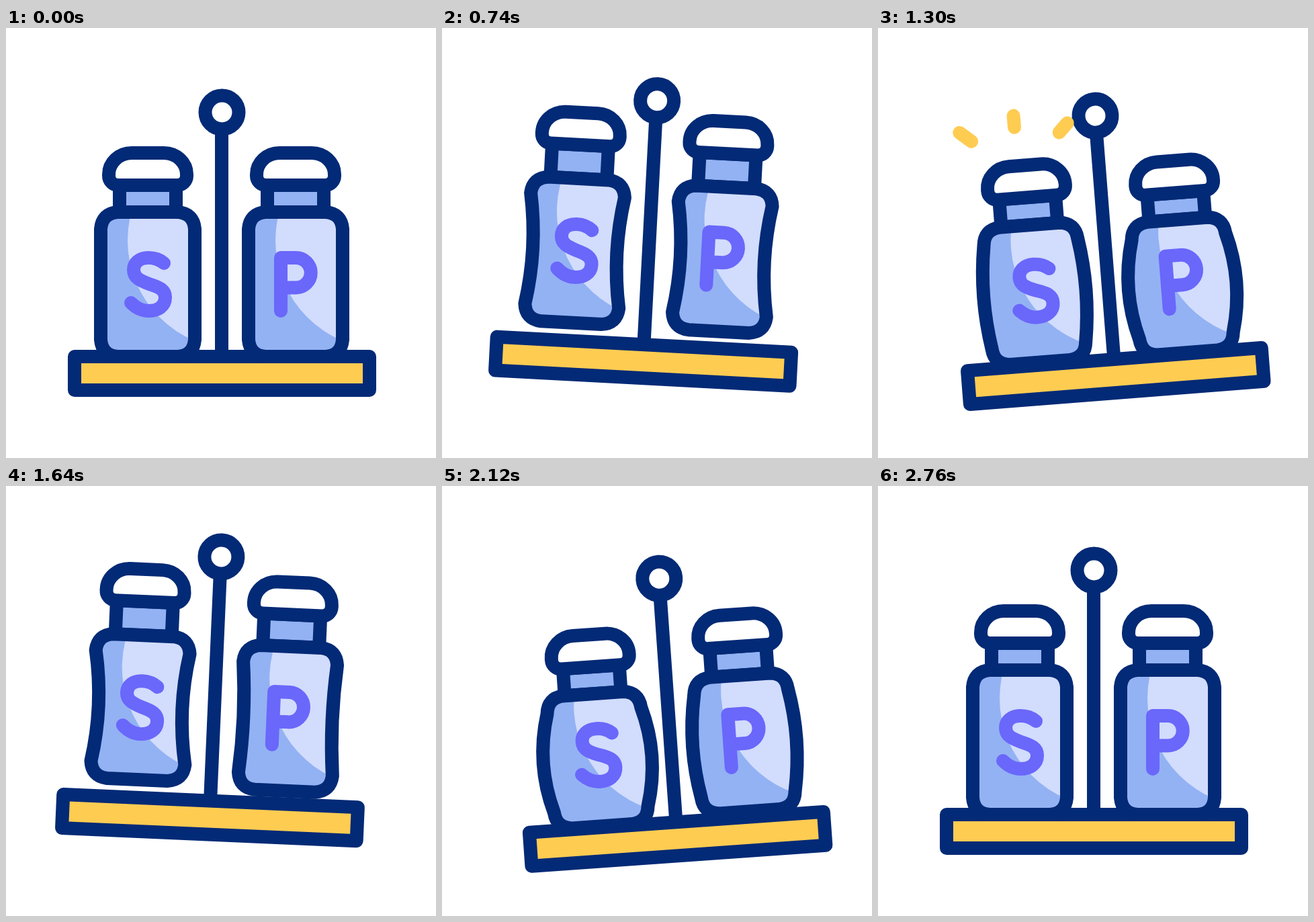
An HTML page with a canvas that plays this animation: 640x640 px, repeating every 3540 ms.

```html
<!DOCTYPE html>
<html lang="en">
<head>
<meta charset="utf-8">
<title>Salt and pepper</title>
<style>
  html, body { margin: 0; width: 100%; height: 100%; overflow: hidden; background: #fff; }
  canvas { display: block; width: 640px; height: 640px; }
</style>
</head>
<body>
<canvas id="stage" width="640" height="640"></canvas>
<script>
const ctx = document.getElementById('stage').getContext('2d');
const LOOP = 3540;
const NAVY = '#032a76', LIGHT = '#d2dcfd', MID = '#93b2f3', PURPLE = '#6a67fb', YELLOW = '#ffcc52';
const PIVOT = { x: 321.5, y: 100 };
const PEPPER_DELAY = 130;

// Keys are [time, value]; values between keys follow a cosine ease.
const RISE = [[220, 0], [645, -20], [1150, 12], [1645, -20], [2145, 12.5], [2520, 0]];
const TILT = [[260, 0], [725, 3.05], [1232, -4.85], [1725, 3.05], [2225, -4.85], [2580, 0]];
const HOP = [[235, 0], [690, -27.5], [1160, 0], [1190, 0], [1690, -27.5], [2150, 0]];
const BULGE = [[235, 0], [690, -8], [1110, 11], [1690, -8], [2110, 11], [2610, 0]];

const SALT_LETTER = new Path2D(
  'M24 350C17 344 9 342 1 342C-13 342 -21 350 -21 360C-21 372 -11 376 2 381' +
  'C18 386 26 390 26 401C26 414 15 421 1 421C-9 421 -18 416 -25 409');
const PEPPER_LETTER = new Path2D('M-22 421V342H.5A22 22 0 0 1 .5 386.5H-22');
const CAP = new Path2D(
  'M-24 186H24A34 32 0 0 1 58 218V220A14 14 0 0 1 44 234H-44A14 14 0 0 1 -58 220V218A34 32 0 0 1 -24 186Z');
const RAYS = [[-49, 163, -82, 135], [0, 150, 0, 116], [53, 159, 79, 133]];

function track(keys, t) {
  if (t <= keys[0][0]) return keys[0][1];
  for (let i = 1; i < keys.length; i++) {
    const [t0, v0] = keys[i - 1], [t1, v1] = keys[i];
    if (t < t1) return v0 + (v1 - v0) * (1 - Math.cos(Math.PI * (t - t0) / (t1 - t0))) / 2;
  }
  return keys[keys.length - 1][1];
}

function outline(path, color = NAVY) {
  ctx.strokeStyle = color;
  ctx.stroke(path);
}

function fill(path, color) {
  ctx.fillStyle = color;
  ctx.fill(path);
}

function bodyPath(top, bottom, bulge) {
  const w = 70, r = 25, c = w + bulge * 4 / 3;
  const y0 = top + r, y1 = bottom - r, third = (y1 - y0) / 3;
  const p = new Path2D();
  p.moveTo(r - w, top);
  p.lineTo(w - r, top);
  p.quadraticCurveTo(w - 2, top + 2, w, y0);
  p.bezierCurveTo(c, y0 + third, c, y1 - third, w, y1);
  p.quadraticCurveTo(w - 2, bottom - 2, w - r, bottom);
  p.lineTo(r - w, bottom);
  p.quadraticCurveTo(2 - w, bottom - 2, -w, y1);
  p.bezierCurveTo(-c, y1 - third, -c, y0 + third, -w, y0);
  p.quadraticCurveTo(2 - w, top + 2, r - w, top);
  p.closePath();
  return p;
}

function drawJar(x, letter, t) {
  const hop = track(HOP, t), bulge = track(BULGE, t);
  const squash = Math.max(0, bulge);
  const sink = squash * 1.45;
  const capShift = sink + hop * 0.38;

  ctx.save();
  ctx.translate(x, hop);

  const neck = new Path2D();
  neck.rect(-42, 234 + capShift, 84, 40 + sink - capShift);
  fill(neck, MID);
  outline(neck);

  const body = bodyPath(274 + sink, 489 - squash * 0.15, bulge);
  fill(body, MID);
  ctx.save();
  ctx.clip(body);
  const shine = new Path2D();
  shine.arc(132, 316, 162, 0, Math.PI * 2);
  fill(shine, LIGHT);
  ctx.restore();
  outline(body);
  outline(letter, PURPLE);

  ctx.translate(0, capShift);
  fill(CAP, '#fff');
  outline(CAP);
  ctx.restore();
}

function drawStand() {
  const pole = new Path2D('M321 158V489');
  const ring = new Path2D();
  ring.arc(321.5, 125.5, 25, 0, Math.PI * 2);
  const tray = new Path2D();
  tray.rect(102, 489, 439, 50);
  outline(pole);
  fill(ring, '#fff');
  outline(ring);
  fill(tray, YELLOW);
  outline(tray);
}

function drawRays(x, u) {
  if (u <= 0 || u >= 1) return;
  const head = Math.min(1, u / 0.6), tail = Math.max(0, (u - 0.4) / 0.6);
  for (const [x0, y0, x1, y1] of RAYS) {
    const at = k => [x + x0 + (x1 - x0) * k, y0 + (y1 - y0) * k];
    const ray = new Path2D();
    ray.moveTo(...at(tail));
    ray.lineTo(...at(head));
    outline(ray, YELLOW);
  }
}

function draw(t) {
  ctx.setTransform(1, 0, 0, 1, 0, 0);
  ctx.fillStyle = '#fff';
  ctx.fillRect(0, 0, 640, 640);
  ctx.lineWidth = 20;
  ctx.lineCap = ctx.lineJoin = 'round';

  ctx.translate(PIVOT.x, PIVOT.y + track(RISE, t));
  ctx.rotate(track(TILT, t) * Math.PI / 180);
  ctx.translate(-PIVOT.x, -PIVOT.y);

  drawStand();
  drawJar(211, SALT_LETTER, t);
  drawJar(431, PEPPER_LETTER, t - PEPPER_DELAY);
  drawRays(200, (t - 1120) / 260);
  drawRays(444, (t - 2240) / 260);
}

const start = performance.now();
function tick() {
  draw((performance.now() - start) % LOOP);
  requestAnimationFrame(tick);
}
tick();
</script>
</body>
</html>
```
